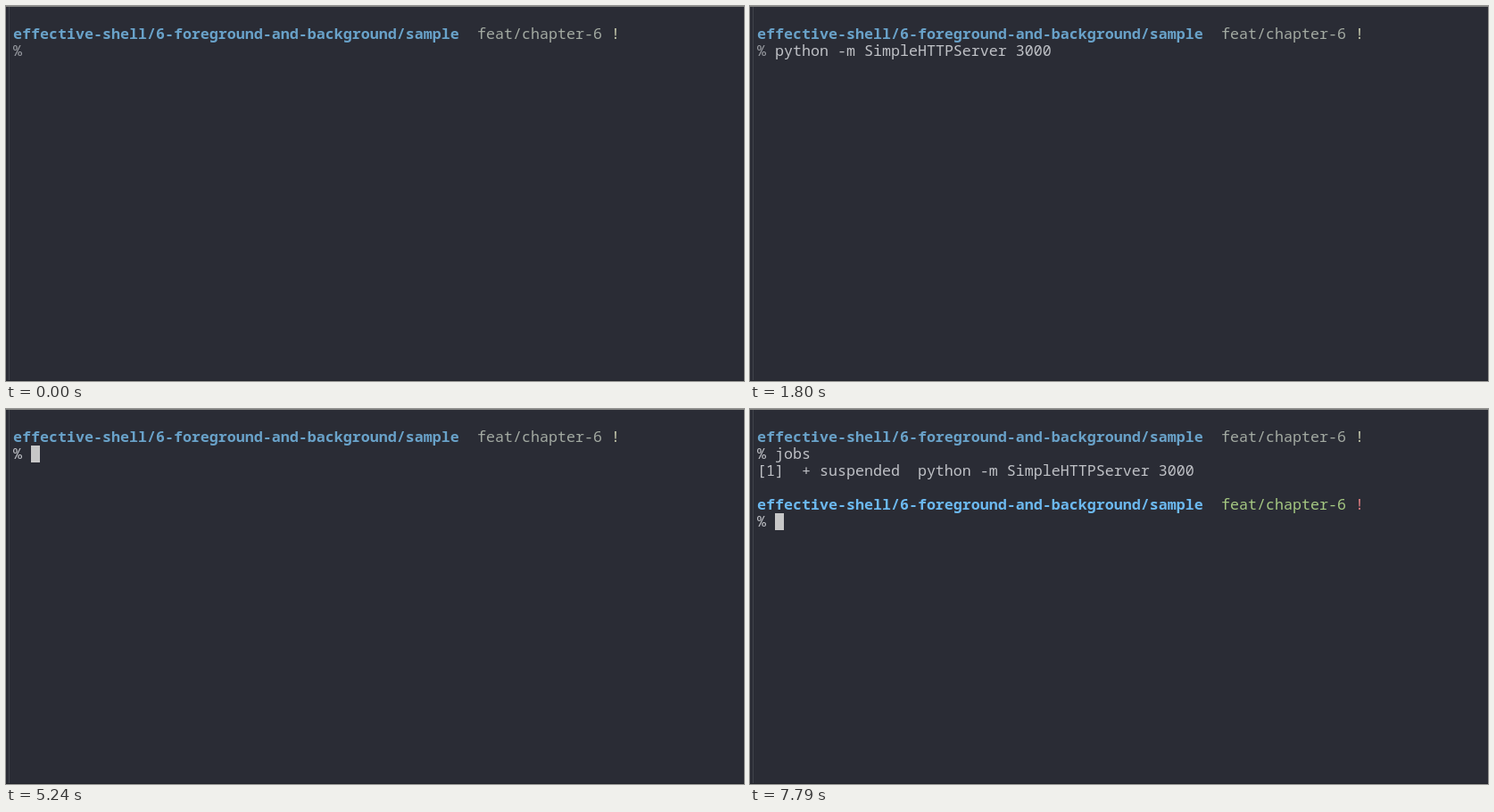
These frames come from a looping animation (827x421 px, 8000 ms). An HTML page with a canvas:

```html
<!DOCTYPE html>
<html lang="en">
<head>
<meta charset="utf-8">
<title>Terminal session</title>
<style>
  html, body { margin: 0; width: 100%; height: 100%; overflow: hidden; background: #2a2c35; }
  canvas { display: block; }
</style>
</head>
<body>
<canvas id="screen" width="827" height="421"></canvas>
<script>
const ctx = document.getElementById('screen').getContext('2d');
const LOOP = 8000, COLUMN = 10, ROW = 19, LEFT = 8, TOP = 22, COLUMNS = 82;
const FONT = '16.6667px "Noto Sans Mono", "DejaVu Sans Mono", monospace';
const COLOR = { text: '#bfc1c6', faded: '#9a9da3', cursor: '#c7c7c7' };
const FADED_PROMPT = ['#69a2c9', '#a3aaa2', '#c3c6aa'];
const BRIGHT_PROMPT = ['#6cb9f0', '#a5c882', '#dc7c80'];

const COMMAND = 'python -m SimpleHTTPServer 3000';
const LIB = '/System/Library/Frameworks/Python.framework/Versions/2.7/lib/python2.7/';
const TRACEBACK = [
  ['runpy', 162, '_run_module_as_main', '"__main__", fname, loader, pkg_name)'],
  ['runpy', 72, '_run_code', 'exec code in run_globals'],
  ['SimpleHTTPServer', 235, '<module>', 'test()'],
  ['SimpleHTTPServer', 231, 'test', 'BaseHTTPServer.test(HandlerClass, ServerClass)'],
  ['BaseHTTPServer', 595, 'test', 'httpd = ServerClass(server_address, HandlerClass)'],
  ['SocketServer', 420, '__init__', 'self.server_bind()'],
];

const wrap = line => line.match(new RegExp(`.{1,${COLUMNS}}`, 'g'));
const traceLines = ['Traceback (most recent call last):'].concat(
  ...TRACEBACK.map(([file, line, scope, code]) =>
    [...wrap(`  File "${LIB}${file}.py", line ${line}, in ${scope}`), '    ' + code]));

// [start ms, typed command, cursor visible, output kind]
const STEPS = [
  [0, '', false],
  [300, 'pytho', true],
  [750, COMMAND, true],
  [1800, COMMAND, false],
  [2250, COMMAND, true],
  [2540, COMMAND, false, 'trace'],
  [5240, '', true],
  [5840, '', false],
  [6290, '', true],
  [6890, 'jo', true],
  [7190, 'jobs', true],
  [7790, 'jobs', false, 'jobs'],
];

function write(text, column, row, color = COLOR.text, bold = false) {
  ctx.font = (bold ? 'bold ' : '') + FONT;
  ctx.fillStyle = color;
  ctx.fillText(text, LEFT + column * COLUMN, TOP + row * ROW + 15);
}

function block(x, y, width, height, color) {
  ctx.fillStyle = color;
  ctx.fillRect(x, y, width, height);
}

function cursor(column, row) {
  block(LEFT + column * COLUMN, TOP + row * ROW, COLUMN, ROW, COLOR.cursor);
}

function prompt(row, [path, branch, mark], sign) {
  write('effective-shell/6-foreground-and-background/sample', 0, row, path, true);
  write('feat/chapter-6', 52, row, branch);
  write('!', 67, row, mark);
  write('%', 0, row + 1, sign);
}

function draw(time) {
  const [, typed, showCursor, output] = STEPS.findLast(step => step[0] <= time);
  block(0, 0, 827, 421, '#2a2c35');
  block(3, 1, 1, 420, '#40434b');
  block(0, 420, 827, 1, '#22242b');

  prompt(0, FADED_PROMPT, time < 2540 ? COLOR.faded : COLOR.text);
  write(typed, 2, 1);
  if (showCursor) cursor(2 + typed.length, 1);

  if (output === 'trace') traceLines.forEach((line, i) => write(line, 0, i + 2));
  if (output === 'jobs') {
    write('[1]  + suspended  ' + COMMAND, 0, 2);
    prompt(4, BRIGHT_PROMPT, COLOR.text);
    cursor(2, 5);
  }
  block(0, 0, 827, 1, '#858683');
}

const start = performance.now();
function tick() {
  draw((performance.now() - start) % LOOP);
  requestAnimationFrame(tick);
}
tick();
</script>
</body>
</html>
```
